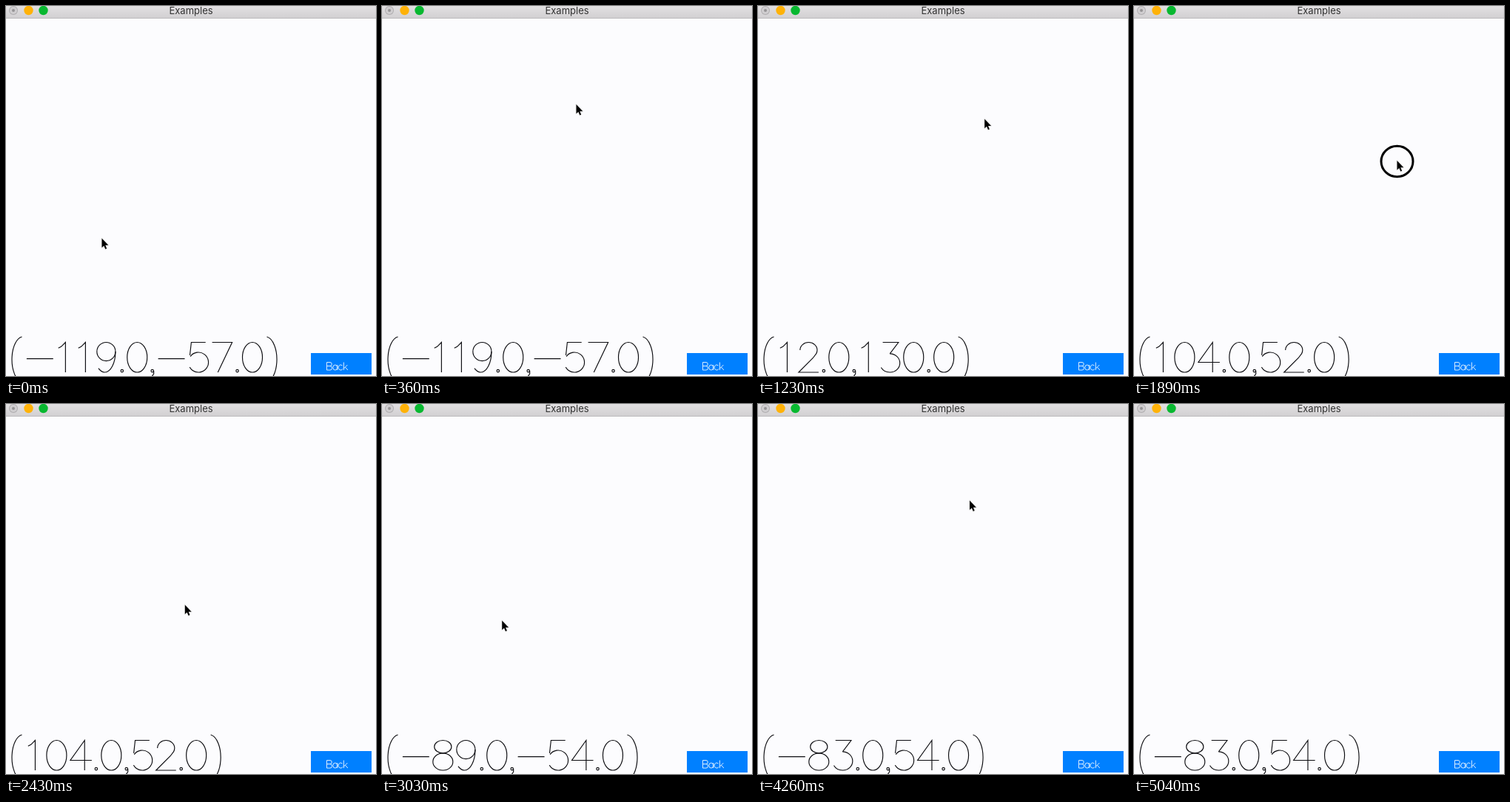
An HTML page with a canvas for the animation above (5.07 s loop, 500 px wide and 500 px high).

```html
<!DOCTYPE html>
<html lang="en">
<meta charset="utf-8">
<title>Examples</title>
<style>
  html, body { margin: 0; width: 100%; height: 100%; overflow: hidden; background: #fcfcfe; }
  canvas { display: block; }
</style>
<canvas id="stage" width="500" height="500"></canvas>
<script>
const ctx = document.getElementById('stage').getContext('2d');
const LOOP = 5070, STEP = 30, RIPPLE = 120, TURN = Math.PI * 2;

// Positions are measured from the origin, with y pointing up.
const ORIGIN = { x: 251.5, y: 262 };
const START = { x: -122, y: -52 };
const MOVES = [
  { leave: 0, arrive: 360, x: 11, y: 129, click: 780, label: [12, 130] },
  { leave: 1110, arrive: 1360, x: 104, y: 53, bend: 16, click: 1830, label: [104, 52] },
  { leave: 2130, arrive: 2670, x: -91, y: -54, click: 2700, label: [-89, -54] },
  { leave: 2970, arrive: 3170, x: -83, y: 54, click: 3510, label: [-83, 54] },
  { leave: 3630, arrive: 3930, x: -30, y: 54 },
  { leave: 4050, arrive: 4600, x: 168, y: 292 }
];

// Single-stroke letters built from lines and arcs, 21 units tall.
const GAP = 2.6;

function line(x, y, ...rest) {
  const path = new Path2D();
  path.moveTo(x, y);
  for (let i = 0; i < rest.length; i += 2) path.lineTo(rest[i], rest[i + 1]);
  return path;
}

function oval(x, y, rx, ry, from = 0, to = 1) {
  const path = new Path2D();
  path.ellipse(x, y, rx, ry, 0, from * TURN, to * TURN);
  return path;
}

const glyph = (width, ...strokes) => ({ width, strokes });
const dot = oval(1, 20, 0.9, 0.9);
const GLYPHS = {
  0: glyph(14, oval(7, 10.5, 7, 10.5)),
  1: glyph(11.4, line(1, 4, 3, 3, 6, 0, 6, 21)),
  2: glyph(14, oval(7, 5.5, 6, 5.5, 0.5, 1.08), line(12.3, 8, 10, 11, 0, 21, 14, 21)),
  3: glyph(14, line(2, 0, 13, 0, 7, 8), oval(7, 14.5, 7, 6.5, -0.25, 0.42)),
  4: glyph(14.5, line(10, 21, 10, 0, 0, 14, 15, 14)),
  5: glyph(14, line(12, 0, 2, 0, 1, 9), oval(7, 14, 7, 7, -0.4, 0.42)),
  7: glyph(14, line(0, 0, 14, 0, 4, 21)),
  8: glyph(14, oval(7, 4.5, 6, 4.5), oval(7, 15, 7, 6)),
  9: glyph(14, oval(6.5, 6.5, 6.5, 6.5), oval(5.5, 6.5, 7.5, 14.5, 0, 0.35)),
  '-': glyph(18.6, line(0, 11.5, 18.6, 11.5)),
  '.': glyph(2, dot),
  ',': glyph(2.5, dot, line(2, 20, 2, 22, 0, 25)),
  '(': glyph(7.7, oval(8, 12, 8, 16, 0.27, 0.73)),
  ')': glyph(7.7, oval(-0.5, 12, 8, 16, -0.23, 0.23)),
  B: glyph(14, line(9, 0, 0, 0, 0, 21, 9, 21), line(0, 10, 9, 10),
    oval(9, 5, 4.5, 5, -0.25, 0.25), oval(9, 15.5, 5, 5.5, -0.25, 0.25)),
  a: glyph(12, oval(6, 14, 6, 7), line(12, 7, 12, 21)),
  c: glyph(12, oval(6.5, 14, 6.5, 7, 0.1, 0.87)),
  k: glyph(11, line(0, 0, 0, 21), line(10, 7, 0, 17), line(4, 13, 11, 21))
};

function strokeText(text, x, y, scale, color, weight) {
  ctx.strokeStyle = color;
  ctx.lineWidth = weight / scale;
  ctx.save();
  ctx.translate(x, y);
  ctx.scale(scale, scale);
  for (const ch of text) {
    const { width, strokes } = GLYPHS[ch];
    strokes.forEach(s => ctx.stroke(s));
    ctx.translate(width + GAP, 0);
  }
  ctx.restore();
}

function disc(x, y, r, color) {
  ctx.fillStyle = color;
  ctx.fill(oval(x, y, r, r));
}

function drawWindow() {
  ctx.fillStyle = '#fcfcfe';
  ctx.fillRect(0, 0, 500, 500);

  const bar = ctx.createLinearGradient(0, 0, 0, 16);
  bar.addColorStop(0, '#e2e0e2');
  bar.addColorStop(1, '#d2d0d2');
  ctx.fillStyle = bar;
  ctx.fillRect(0, 0, 500, 16);
  ctx.fillStyle = '#bcbabc';
  ctx.fillRect(0, 16, 500, 1);

  disc(10, 6, 6, '#b0aeb0');
  disc(10, 6, 5, '#d0ced0');
  disc(10, 6, 2, '#969496');
  disc(30.5, 6, 6.2, '#ffb208');
  disc(50.5, 6, 6.2, '#08b830');

  ctx.fillStyle = '#333';
  ctx.font = '13px Inter, Roboto, sans-serif';
  ctx.textAlign = 'center';
  ctx.fillText('Examples', 250, 11);

  ctx.fillStyle = '#0080ff';
  ctx.fillRect(412, 469, 82, 29);
  strokeText('Back', 433.5, 481.5, 0.5, '#fff', 0.85);
}

function drawClick(t) {
  const last = MOVES.filter(m => m.click <= t).pop();
  const [x, y] = last ? last.label : [-119, -57];
  strokeText(`(${x.toFixed(1)},${y.toFixed(1)})`, 8, 454.5, 1.93, '#0c0c10', 1.15);

  const age = last ? t - last.click : RIPPLE;
  if (age >= RIPPLE) return;
  const r = 13.5 + age / STEP * 4;
  ctx.strokeStyle = '#000';
  ctx.lineWidth = 3;
  ctx.stroke(oval(ORIGIN.x + x, ORIGIN.y - y, r, r * 0.96));
}

function pointer(t) {
  let { x, y } = START;
  for (const m of MOVES) {
    const u = Math.min(1, Math.max(0, (t - m.leave) / (m.arrive - m.leave)));
    const ease = u * u * (3 - 2 * u);
    x += (m.x - x) * ease;
    y += (m.y - y) * ease + (m.bend || 0) * Math.sin(Math.PI * u);
  }
  return [ORIGIN.x + x, ORIGIN.y - y];
}

const ARROW = line(0, 0, 0, 12.5, 2.8, 10, 4.8, 14.5, 6.6, 13.7, 4.8, 9.3, 8.8, 9.3);
ARROW.closePath();

function drawPointer(t) {
  ctx.save();
  ctx.translate(...pointer(t));
  ctx.lineJoin = 'round';
  ctx.lineWidth = 2;
  ctx.strokeStyle = '#ececec';
  ctx.stroke(ARROW);
  ctx.fillStyle = '#000';
  ctx.fill(ARROW);
  ctx.restore();
}

const began = performance.now();

function frame() {
  const elapsed = (performance.now() - began) % LOOP;
  const t = Math.floor(elapsed / STEP) * STEP;
  drawWindow();
  drawClick(t);
  drawPointer(t);
  requestAnimationFrame(frame);
}
frame();
</script>
</html>
```
